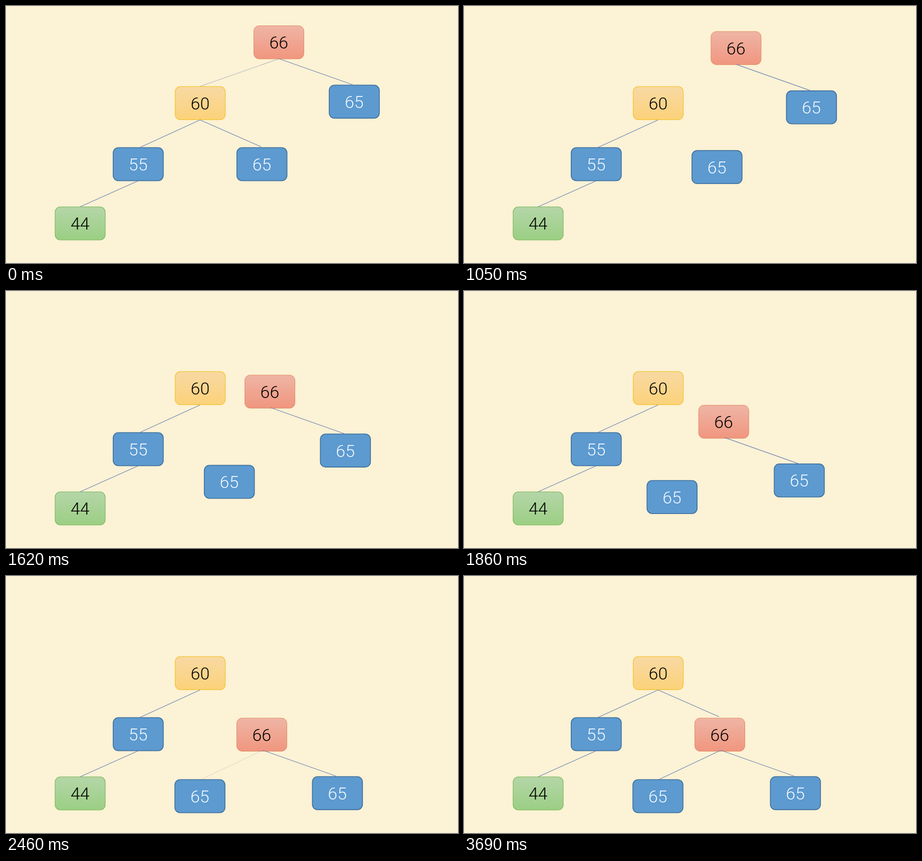
Recreate the animation shown at these times as an HTML page. Size 902 by 514 pixels, loop 3720 ms.

```html
<!DOCTYPE html>
<html lang="en">
<head>
<meta charset="utf-8">
<title>Tree rotation</title>
<style>
  html, body { margin: 0; width: 100%; height: 100%; overflow: hidden; background: #fcf2d5; }
  svg { display: block; width: 902px; height: 514px; }
  text { font: 300 34px Roboto, "Noto Sans CJK SC", "Liberation Sans", sans-serif; text-anchor: middle; }
  line { stroke: #6d84b2; stroke-width: 1.15; }
</style>
</head>
<body>
<svg id="stage" viewBox="0 0 902 514">
  <defs>
    <linearGradient id="red" x2="0" y2="1"><stop stop-color="#efb5a5"/><stop offset="1" stop-color="#f0967f"/></linearGradient>
    <linearGradient id="gold" x2="0" y2="1"><stop stop-color="#f8d9a3"/><stop offset="1" stop-color="#fcd27a"/></linearGradient>
    <linearGradient id="green" x2="0" y2="1"><stop stop-color="#b5d6a8"/><stop offset="1" stop-color="#9bcf84"/></linearGradient>
  </defs>
</svg>
<script>
const LOOP = 3720, STEP = 30;
const MOVE = { start: 816, span: 1560, ramp: 0.4 };
const FADE = 390;
const stage = document.getElementById('stage');

const STYLES = {
  red: ['url(#red)', '#e08a62', 1, '#000'],
  gold: ['url(#gold)', '#f3c32c', 1.2, '#000'],
  green: ['url(#green)', '#78b555', 1.1, '#000'],
  blue: ['#5c9ad0', '#3f6f9c', 1.6, '#f4f9ff']
};

function add(parent, tag, attrs) {
  const el = document.createElementNS('http://www.w3.org/2000/svg', tag);
  for (const key in attrs) el.setAttribute(key, attrs[key]);
  return parent.appendChild(el);
}

function node(label, style, x, y) {
  const [fill, stroke, width, ink] = STYLES[style];
  const g = add(stage, 'g', { transform: `translate(${x} ${y})` });
  add(g, 'rect', { width: 100, height: 66.2, rx: 10.5, fill, stroke, 'stroke-width': width });
  add(g, 'text', { x: 49.8, y: 45.6, fill: ink }).textContent = label;
  return g;
}

function edge(x1, y1, x2, y2) {
  return add(stage, 'line', { x1, y1, x2, y2 });
}

node('60', 'gold', 337.6, 161.2);
node('55', 'blue', 213.9, 283.3);
node('44', 'green', 98, 401.8);
const root = node('66', 'red', 494.5, 39.6);
const right = node('65', 'blue', 645, 158.2);
const inner = node('65', 'blue', 460.7, 283.3);

edge(387, 228, 267, 283);
edge(263, 350, 148, 401.5);
const rootLeft = edge(545, 105.5, 388, 160.5);
const rootRight = edge(545, 105.5, 692, 157.5);
const goldRight = edge(387.5, 228, 509, 281.5);
const newLeft = edge(511.5, 349, 389, 407);

const clamp = v => Math.min(1, Math.max(0, v));
const ramp = (t, start) => clamp((t - start) / FADE);

// Constant acceleration, steady speed, constant braking.
function glide(t) {
  const u = clamp((t - MOVE.start) / MOVE.span), a = MOVE.ramp;
  const k = 1 / (2 * a * (1 - a));
  if (u < a) return k * u * u;
  if (u > 1 - a) return 1 - k * (1 - u) * (1 - u);
  return (u - a / 2) / (1 - a);
}

function place(el, x, y, dx, dy, p) {
  el.setAttribute('transform', `translate(${x + dx * p} ${y + dy * p})`);
}

function draw(t) {
  const p = glide(t);
  place(root, 494.5, 39.6, -34, 244.6, p);
  place(right, 645, 158.2, -33.6, 243, p);
  place(inner, 460.7, 283.3, -123.7, 124, p);
  place(rootRight, 0, 0, -32.5, 243, p);
  rootLeft.style.opacity = 1 - ramp(t, -180);
  goldRight.style.opacity = t < 1600 ? 1 - ramp(t, 300) : ramp(t, 2766);
  newLeft.style.opacity = ramp(t, 2376);
}

const origin = performance.now();
function tick() {
  const t = (performance.now() - origin) % LOOP;
  draw(Math.floor(t / STEP) * STEP);
  requestAnimationFrame(tick);
}
draw(0);
requestAnimationFrame(tick);
</script>
</body>
</html>
```
